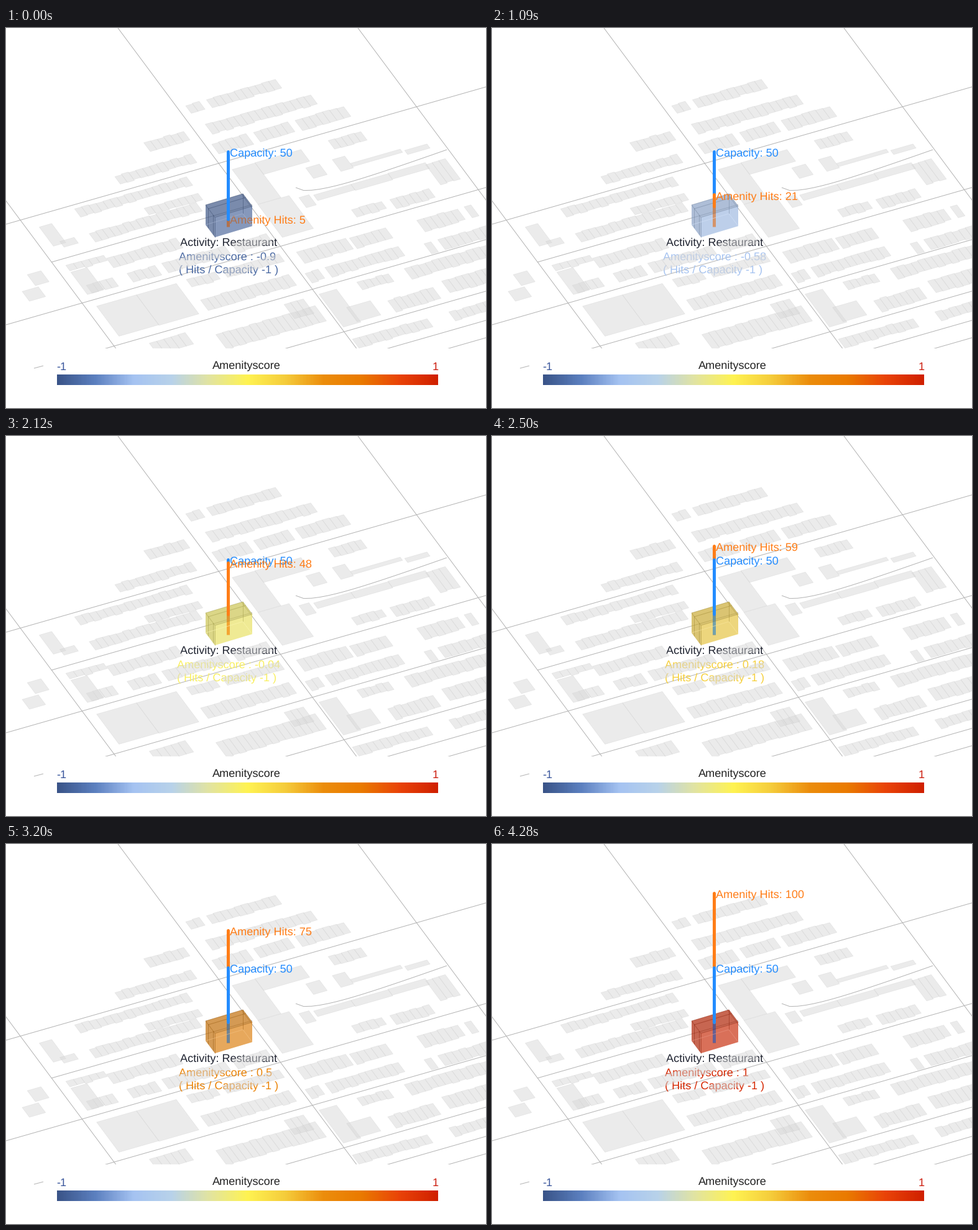
A matplotlib script for the animation above (4.83 s loop, 772 by 612 pixels).

```python
import numpy as np
import matplotlib.pyplot as plt
from matplotlib.animation import FuncAnimation
from matplotlib.collections import LineCollection, PolyCollection
from matplotlib.colors import LinearSegmentedColormap
from matplotlib.patches import Polygon, Rectangle

W, H, DPI = 772, 612, 100
PX = 72 / DPI
LOOP, STEP = 4830, 30
CAPACITY = 50
BLUE, ORANGE = "#238cff", "#ff7d17"
MAP_END = 516

plt.rcParams["font.family"] = "Liberation Sans"
plt.rcParams["text.hinting"] = "none"
rng = np.random.default_rng(7)

fig = plt.figure(figsize=(W / DPI, H / DPI), dpi=DPI, facecolor="white")
ax = fig.add_axes([0, 0, 1, 1])
ax.axis("off")

scale = LinearSegmentedColormap.from_list("score", [
    "#3a5488", "#5c80c0", "#a5c3f2", "#b8d2ea", "#e2e4a0", "#fff352",
    "#f5cc3b", "#ec8d0c", "#ea7a00", "#e94308", "#d02000"], N=512)


def label(x, y, s, color, z=3, **kw):
    return ax.text(x, y, s, color=color, fontsize=18.15 * PX, va="baseline",
                   zorder=z, **kw)


def lines(segments, color, z):
    return ax.add_collection(LineCollection(segments, colors=[color],
                                            linewidths=PX, zorder=z))


# The map is a skewed grid: streets rise to the right, avenues fall steeply.
ALONG = np.array([1, -.2865])
DOWN = np.array([.7435, 1])


def street(y, x0=0, x1=W):
    return [(x, y + ALONG[1] * x) for x in (x0, x1)]


def avenue(x):
    return [(x + DOWN[0] * y, y) for y in (0, MAP_END)]


bend = np.linspace(0, 1, 20)
lane = np.column_stack([466 + 243 * bend,
                        257 - 61 * bend ** 1.4 + 9 * np.sin(np.pi * bend ** .5)
                        * (1 - bend)])
lines([street(y) for y in (316, 478, 562, 645, 692, 720)]
      + [street(398, 73, 396), lane]
      + [avenue(x) for x in (-207, 180, 566)], "#b4b4b4", 1)


def terrace(x, y, width, depth, lot=11, gaps=.05):
    """Houses side by side along a street, with uneven fronts and yards."""
    n = max(1, round(width / lot))
    for k in range(n):
        if n > 3 and rng.random() < gaps:
            continue
        a = np.array([x, y]) + ALONG * width * k / n
        b = a + ALONG * width / n
        front, back = DOWN * rng.uniform(0, 1.5), DOWN * (depth - rng.uniform(0, 2))
        yield [a + front, b + front, b + back, a + back]


# x, y, width, depth of each terrace
NORTH = [(288, 124, 145, 15), (309, 158, 180, 17), (330, 186, 212, 18),
         (221, 184, 64, 16), (174, 238, 134, 14), (110, 291, 180, 14),
         (222, 290, 86, 12), (133, 330, 183, 15), (161, 370, 112, 17),
         (183, 398, 235, 16), (96, 382, 60, 11), (128, 413, 42, 15)]
SOUTH = [(290, 405, 148, 14), (312, 437, 142, 19), (230, 507, 58, 20),
         (337, 493, 160, 25), (447, 445, 31, 24), (564, 409, 50, 14),
         (613, 438, 73, 20), (640, 387, 132, 18), (700, 407, 75, 21),
         (557, 501, 130, 15), (712, 457, 65, 15)]
EAST = [(674, 219, 32, 34), (555, 292, 60, 14), (617, 276, 73, 16),
        (518, 181, 52, 15), (455, 363, 90, 20), (480, 394, 150, 17),
        (552, 338, 58, 18), (649, 312, 98, 20), (672, 347, 100, 17)]
# large buildings that are not split into lots
HALLS = [(363, 227, 37, 57), (405, 284, 50, 55), (400, 216.5, 74, 20),
         (471, 273, 16, 18), (494, 268, 180, 11), (481, 224, 22, 20),
         (524, 211, 20, 21), (554, 218, 80, 7), (641, 197, 36, 7),
         (145, 447, 128, 51), (34, 397, 22, 18), (25, 423, 26, 19),
         (104, 393, 26, 38), (53, 320, 20, 32), (86, 343, 23, 10),
         (503, 428, 28, 54), (547, 449, 38, 25)]
houses = [q for t in NORTH + SOUTH + EAST for q in terrace(*t)]
houses += [q for t in HALLS for q in terrace(*t, lot=60)]
# half transparent, so that captions lying on the ground show through
ax.add_collection(PolyCollection(houses, facecolors=[(.85, .85, .85, .5)],
                                 edgecolors=[(.78, .78, .78, .35)],
                                 linewidths=.7 * PX, zorder=2))

# Legend
ax.add_patch(Rectangle((0, MAP_END), W, H - MAP_END, fc="white", lw=0,
                       zorder=2.5))
lines([[(45, 548), (60, 544)]], "#b4b4b4", 3)
ax.imshow(np.linspace(0, 1, 512)[None], cmap=scale, aspect="auto",
          extent=(82, 695, 575, 558), zorder=3)
label(81, 551, "-1", "#3b579c")
label(386.5, 548, "Amenityscore", "#222222", ha="center")
label(691, 551, "1", "#cc1f10", ha="center")

# Building: a glass box spanned by width, depth and height
CORNER = np.array([321, 285])
WIDE, DEEP, TALL = np.array([(60, -18), (15, 20), (0, 32)])


def at(u, v, w):
    """Point in the box; w runs from the roof down to the floor."""
    return CORNER + u * WIDE + v * DEEP + w * TALL


def face(corners, z):
    return ax.add_patch(Polygon([at(*c) for c in corners], lw=0, zorder=z))


roof = [(0, 0, 0), (1, 0, 0), (1, 1, 0), (0, 1, 0)]
left = [(0, 0, 0), (0, 1, 0), (0, 1, 1), (0, 0, 1)]
front = [(0, 1, 0), (1, 1, 0), (1, 1, 1), (0, 1, 1)]
shell = [(0, 0, 0), (1, 0, 0), (1, 1, 0), (1, 1, 1), (0, 1, 1), (0, 0, 1)]
# face, shade, opacity
faces = [(face(shell, 4), .95, .40), (face(roof, 6), .76, .47),
         (face(left, 6), .76, .47), (face(front, 6), .92, .42)]
edges = lines([[at(*c) for c in roof + roof[:1]]]
              + [[at(0, v, 0), at(0, v, 1)] for v in (.25, .8, 1)]
              + [[at(1, 0, 0), at(1, 0, 1)], [at(0, .3, 0), at(1, .3, 0)]],
              "k", 6.1)
floor = lines([[at(0, 0, 1), at(1, 0, 1), at(1, 1, 1)]], "w", 6.1)

# Bars and captions
BAR_X, BASE, UNIT, ROOF = 357.2, 320, 2.405, 287


def height(v):
    return BASE - UNIT * v


class Bar:
    """Vertical bar in two parts: inside the box and above its roof."""

    def __init__(self, color):
        self.inner, self.outer = (
            ax.plot([], [], color=color, lw=5 * PX, solid_capstyle=cap)[0]
            for cap in ("butt", "round"))

    def set(self, start, end, split, order):
        for part, y0, y1, z in ((self.inner, start, max(end, split), 5),
                                (self.outer, min(start, split), end, 7)):
            part.set_data([BAR_X, BAR_X], [y0, y1 - 1])
            part.set_visible(y0 > y1)
            part.set_zorder(z + order)


hits_bar, cap_bar = Bar(ORANGE), Bar(BLUE)
label(360, height(CAPACITY) + 6.3, f"Capacity: {CAPACITY}", BLUE, 9)
hits_text = label(360, 0, "", ORANGE, 9)
label(358.3, 350, "Activity: Restaurant", "#1f2330", 1.5, ha="center")
score_text = label(0, 373.5, "", "k", 1.5)
rule_text = label(0, 394.5, "( Hits / Capacity -1 )", "k", 1.5)

ax.set_xlim(0, W)
ax.set_ylim(H, 0)

# Counter: ticks at a steady rate along a nearly straight ramp
START, TICK = 306, 77.9
TIMES = (310, 390, 470, 1090, 1720, 2500, 4280)
HITS = (6, 7, 7, 21, 37, 59, 100)


def hits_at(t):
    if t < START:
        return 5
    tick = START + (t - START) // TICK * TICK
    return round(float(np.interp(tick, TIMES, HITS)))


def update(i):
    hits = hits_at(i * STEP + 20)
    score = round(hits / CAPACITY - 1, 2)
    rgb = np.array(scale(min((score + 1) / 2, .98))[:3])
    y = height(hits)

    for patch, shade, alpha in faces:
        patch.set_facecolor((*(rgb * shade), alpha))
    edges.set_color([(*(rgb * .6), .4)])
    floor.set_color([(*(rgb * .5 + .5), .6)])

    # the shorter bar covers the longer one
    over = hits > CAPACITY
    hits_bar.set(BASE, y, ROOF, 0 if over else .2)
    cap_bar.set(BASE if over else y, height(CAPACITY),
                ROOF if over else BASE, .1)

    hits_text.set_text(f"Amenity Hits: {hits}")
    hits_text.set_y(y + 6.3)
    hits_text.set_zorder(9 if y < ROOF else 5.5)

    score_text.set_text(f"Amenityscore : {score:g}")
    block = (score_text, rule_text)
    width = max(s.get_window_extent().width for s in block)
    for s in block:
        s.set_x(358.3 - width / 2)
        s.set_color(rgb)


anim = FuncAnimation(fig, update, frames=LOOP // STEP, interval=STEP,
                     repeat=True, repeat_delay=0, blit=False)
plt.show()
```
